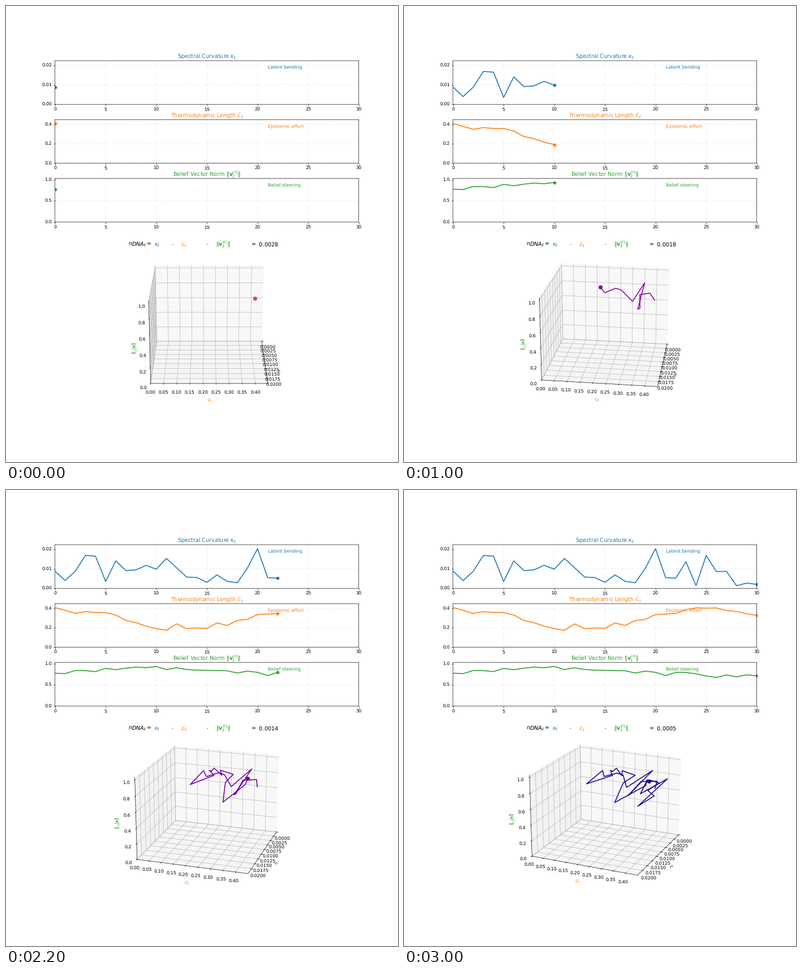
These frames come from a looping animation (693 px wide and 808 px high, 3100 ms). A matplotlib script:

```python
import numpy as np
import matplotlib.pyplot as plt
from matplotlib.animation import FuncAnimation

# Smooth, unsnapped text and lines
plt.rcParams["text.hinting"] = "none"
plt.rcParams["path.snap"] = False

BLUE, ORANGE, GREEN = "tab:blue", "tab:orange", "tab:green"
KAPPA = r"$\kappa_\ell$"
LENGTH = r"$\mathcal{L}_\ell$"
BELIEF = r"$\|\mathbf{v}_\ell^{(c)}\|$"

# Each quantity is a slow wave over the layers plus seeded noise
layers = np.arange(31)
rng = np.random.RandomState(0)


def noise(scale):
    return scale * rng.randn(len(layers))


kappa = np.abs(0.01 * np.sin(layers / 5) + noise(0.005))
length = 0.3 + 0.1 * np.cos(layers / 4) + noise(0.02)
belief = 0.8 + 0.1 * np.sin(layers / 6) + noise(0.03)

ndna = kappa * length * belief
colors = plt.cm.plasma((ndna - ndna.min()) / np.ptp(ndna))

fig = plt.figure(figsize=(12, 13.9914), dpi=57.75)
grid = fig.add_gridspec(4, 1, height_ratios=[1, 1, 1, 4])


def make_panel(row, values, title, note, color):
    ax = fig.add_subplot(grid[row])
    ax.set_xlim(0, layers[-1])
    ax.set_ylim(0, values.max() * 1.1)
    ax.set_title(title, color=color)
    ax.grid(True, linestyle="--", alpha=0.3)
    ax.text(0.7, 0.85, note, color=color, va="center", transform=ax.transAxes)
    line, = ax.plot([], [], color=color, lw=2)
    dot, = ax.plot([], [], "o", color=color)
    return values, line, dot


panels = [
    make_panel(0, kappa, "Spectral Curvature " + KAPPA,
               "Latent bending", BLUE),
    make_panel(1, length, "Thermodynamic Length " + LENGTH,
               "Epistemic effort", ORANGE),
    make_panel(2, belief, "Belief Vector Norm " + BELIEF,
               "Belief steering", GREEN),
]

space = fig.add_subplot(grid[3], projection="3d")
space.set_xlim(0, kappa.max() * 1.1)
space.set_ylim(0, length.max() * 1.1)
space.set_zlim(0, belief.max() * 1.1)
space.set_xlabel(KAPPA, color=BLUE)
space.set_ylabel(LENGTH, color=ORANGE)
space.set_zlabel(BELIEF, color=GREEN)
path, = space.plot([], [], [], lw=2)
head, = space.plot([], [], [], "o", markersize=8)


def formula_part(x, text, color="black"):
    return space.text2D(x, 0.95, text, color=color, fontsize=12,
                        transform=space.transAxes)


formula_part(0.05, r"$nDNA_\ell =$")
formula_part(0.20, KAPPA, BLUE)
formula_part(0.30, "·")
formula_part(0.35, LENGTH, ORANGE)
formula_part(0.50, "·")
formula_part(0.55, BELIEF, GREEN)
result = formula_part(0.75, "")


def update(i):
    seen = slice(0, i + 1)
    for values, line, dot in panels:
        line.set_data(layers[seen], values[seen])
        dot.set_data([i], [values[i]])
    path.set_data_3d(kappa[seen], length[seen], belief[seen])
    head.set_data_3d([kappa[i]], [length[i]], [belief[i]])
    path.set_color(colors[i])
    head.set_color(colors[i])
    result.set_text(f"$=$ {ndna[i]:.4f}")
    space.view_init(elev=20, azim=0.8 * i)
    return []


anim = FuncAnimation(fig, update, frames=len(layers), interval=100,
                     init_func=lambda: update(0), repeat=True, repeat_delay=0)
plt.show()
```
